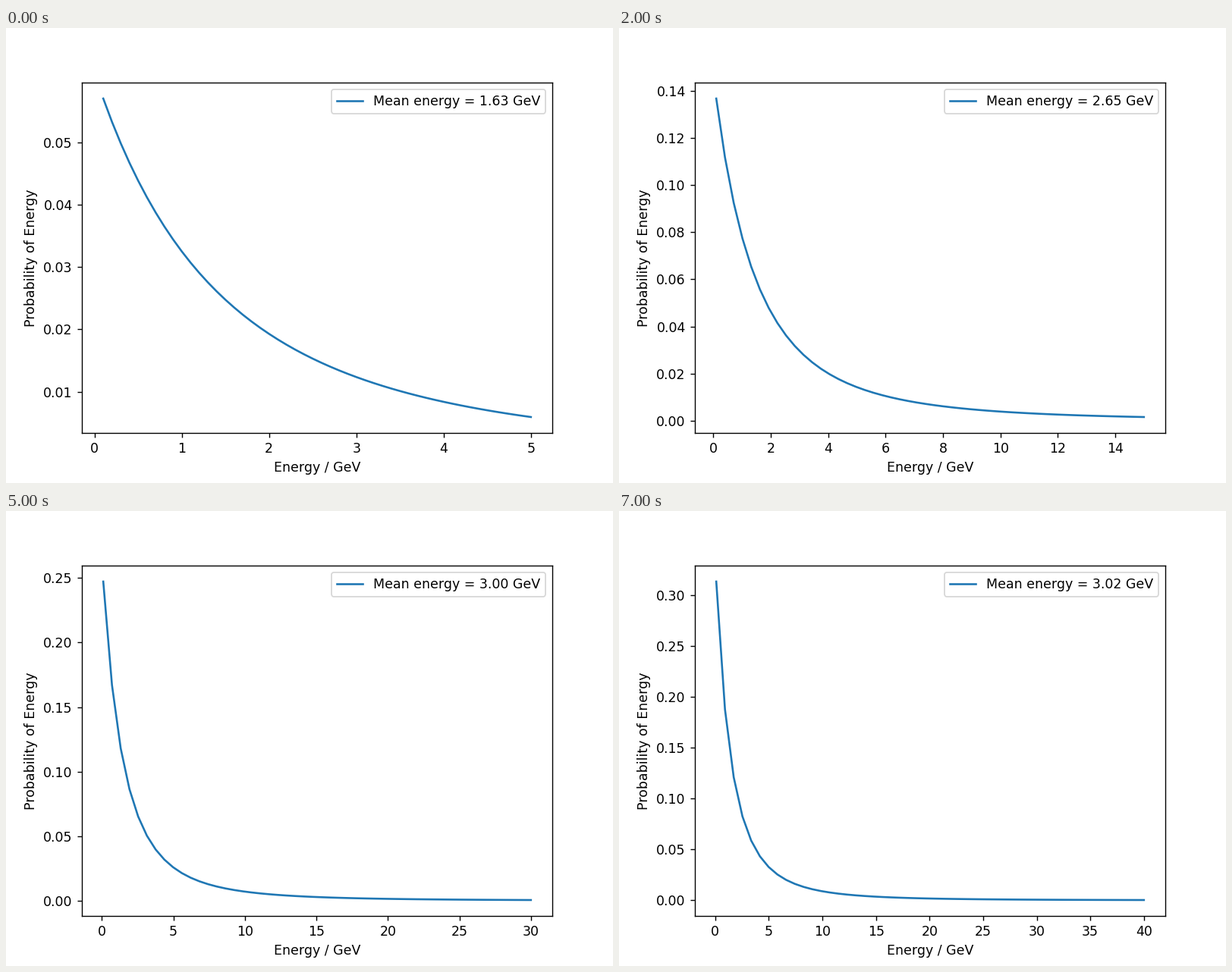
Write a matplotlib script that moves like this. It is 800 px wide and 600 px high and loops after 8 s.

```python
import numpy as np
import matplotlib.pyplot as plt
from matplotlib.animation import FuncAnimation

FRAMES = 8
INTERVAL = 1000  # ms
POINTS = 50
E_MIN, E_STEP = 0.1, 5

fig, ax = plt.subplots(figsize=(6.4, 4.8), dpi=125)


def spectrum(energy):
    """Sea-level muon energy spectrum, normalised over the sampled points."""
    flux = (4.29 + energy) ** -3.01 / (1 + energy / 854)
    return flux / flux.sum()


def draw(frame):
    energy = np.linspace(E_MIN, E_STEP * (frame + 1), POINTS)
    prob = spectrum(energy)
    mean = np.sum(energy * prob)

    ax.clear()
    ax.plot(energy, prob, color="#1f77b4", label=f"Mean energy = {mean:.2f} GeV")
    ax.set_xlabel("Energy / GeV")
    ax.set_ylabel("Probability of Energy")
    ax.legend(loc="upper right")
    return ax.lines


anim = FuncAnimation(fig, draw, frames=FRAMES, interval=INTERVAL,
                     repeat=True, repeat_delay=0, blit=False)
plt.show()
```
